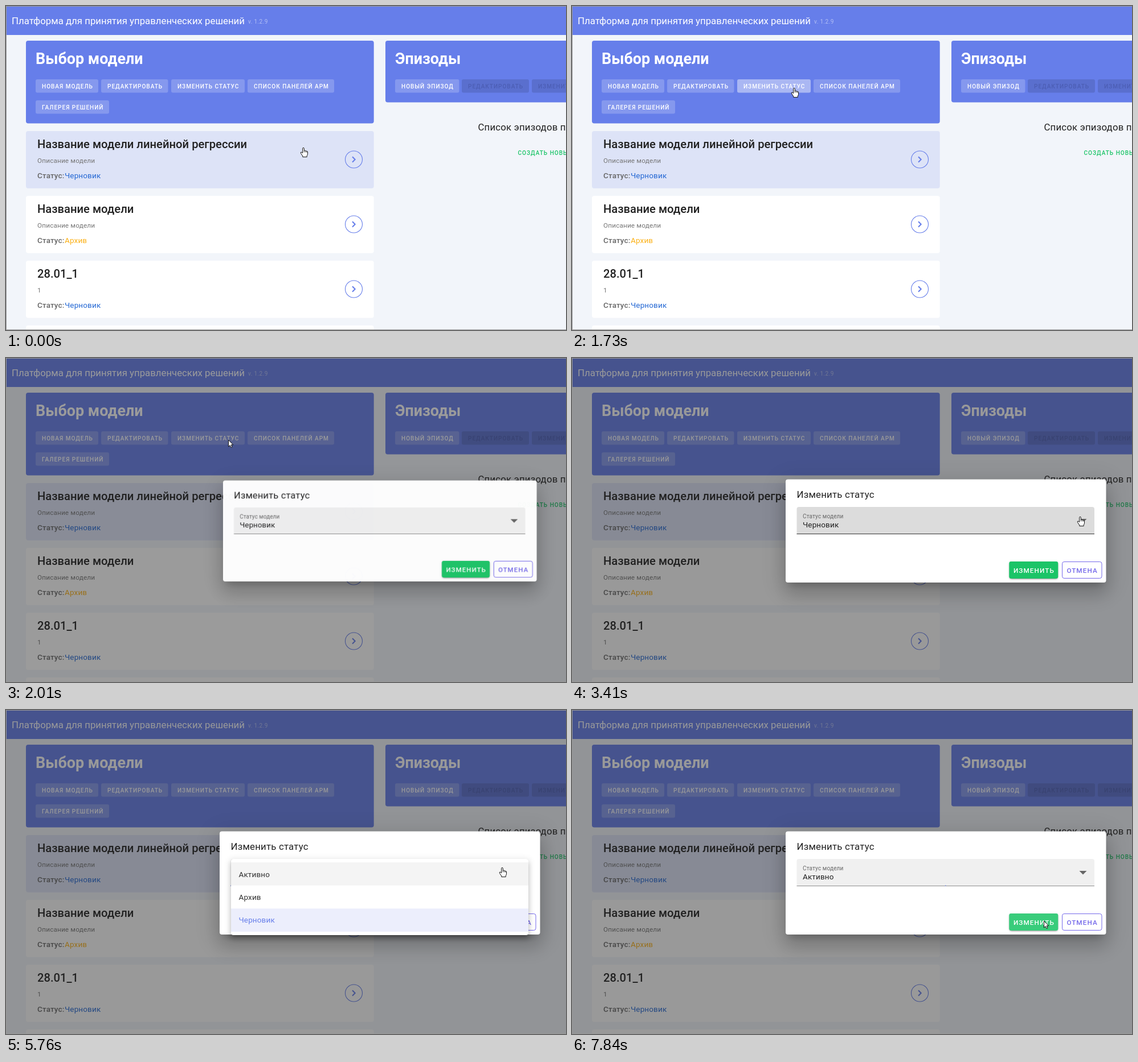
Write an HTML page with a canvas that moves like this. It is 983 px wide and 570 px high and loops after 7.99 s.

```html
<!DOCTYPE html>
<html lang="ru">
<head>
<meta charset="utf-8">
<title>Изменить статус</title>
<style>
html, body { margin: 0; width: 100%; height: 100%; overflow: hidden; background: #f2f5fa; }
canvas { display: block; }
</style>
</head>
<body>
<canvas id="stage" width="983" height="570"></canvas>
<script>
const W = 983, H = 570, LOOP = 7990;
const BLUE = '#667eea', VIOLET = '#7468ea', GREEN = '#1bc467', INK = '#212121';
const screen = document.getElementById('stage').getContext('2d');

function makeLayer() {
  const c = document.createElement('canvas');
  c.width = W;
  c.height = H;
  return c.getContext('2d');
}
const page = makeLayer(), dialogLayer = makeLayer(), menuLayer = makeLayer();
let g = screen;

// ---- drawing helpers ----
function box(x1, y1, x2, y2, fill, r = 4) {
  g.fillStyle = fill;
  g.beginPath();
  g.roundRect(x1, y1, x2 - x1, y2 - y1, r);
  g.fill();
}

function text(str, x, y, size, color, weight = 400, spacing = 0) {
  g.font = `${weight} ${size}px Roboto, sans-serif`;
  g.letterSpacing = spacing + 'px';
  g.fillStyle = color;
  g.fillText(str, x, y);
}

// Shadows only: the shape itself is drawn off stage.
function shadow(x1, y1, x2, y2, list) {
  for (const [dy, blur, spread, alpha] of list) {
    g.save();
    g.shadowColor = `rgba(0,0,0,${alpha})`;
    g.shadowBlur = blur;
    g.shadowOffsetX = 3000;
    g.shadowOffsetY = dy;
    box(x1 - spread - 3000, y1 - spread, x2 + spread - 3000, y2 + spread, '#000');
    g.restore();
  }
}

function chip(x1, x2, y, label, off) {
  box(x1, y, x2, y + 23.5, off ? 'rgba(0,0,0,.12)' : 'rgba(255,255,255,.2)', 3);
  text(label, x1 + 11, y + 15.5, 10.1, off ? '#4c5eb4' : '#fff', 500, 0.95);
}

function modelCard(y, title, about, status, color, fill) {
  box(35, y, 645.7, y + 100.7, fill);
  text(title, 55, y + 30, 20.16, INK, 500);
  text(about, 55, y + 56, 11.76, '#757575', 400, 0.16);
  text('Статус:', 55, y + 83, 13.5, '#666', 500, 0.13);
  text(status, 103, y + 83, 13.5, color, 400, 0.13);
  g.strokeStyle = BLUE;
  g.lineWidth = 1.1;
  g.beginPath();
  g.arc(610.5, y + 50, 15, 0, 7);
  g.stroke();
  g.lineWidth = 2;
  g.beginPath();
  g.moveTo(608, y + 45.3);
  g.lineTo(612.7, y + 50);
  g.lineTo(608, y + 54.7);
  g.stroke();
}

function drawPage() {
  g = page;
  g.fillStyle = '#f2f5fa';
  g.fillRect(0, 0, W, H);
  g.fillStyle = BLUE;
  g.fillRect(0, 0, W, 51);
  text('Платформа для принятия управленческих решений', 10, 32, 16.8, '#fff');
  text('v. 1.2.9', 425, 31, 10.1, 'rgba(255,255,255,.5)', 400, 0.35);

  box(35, 61, 645.7, 206.5, BLUE);
  text('Выбор модели', 52, 102, 26.9, '#fff', 700);
  chip(52, 162, 129, 'НОВАЯ МОДЕЛЬ');
  chip(167, 284.5, 129, 'РЕДАКТИРОВАТЬ');
  chip(290, 419, 129, 'ИЗМЕНИТЬ СТАТУС');
  chip(424, 576, 129, 'СПИСОК ПАНЕЛЕЙ АРМ');
  chip(52, 181, 166, 'ГАЛЕРЕЯ РЕШЕНИЙ');

  box(666, 61, 1200, 169.5, BLUE);
  text('Эпизоды', 683, 102, 26.9, '#fff', 700);
  chip(683, 795.5, 129, 'НОВЫЙ ЭПИЗОД');
  chip(800, 918, 129, 'РЕДАКТИРОВАТЬ', true);
  chip(923, 1052, 129, 'ИЗМЕНИТЬ СТАТУС', true);
  text('Список эпизодов пуст', 828.5, 219, 16.8, INK, 400, 0.19);
  text('СОЗДАТЬ НОВЫЙ', 898.5, 262, 10.1, GREEN, 500, 0.95);

  const draft = ['Черновик', '#2468d4'];
  modelCard(220, 'Название модели линейной регрессии', 'Описание модели', ...draft, '#dde3f7');
  modelCard(334, 'Название модели', 'Описание модели', 'Архив', '#fbb117', '#fff');
  modelCard(448, '28.01_1', '1', ...draft, '#fff');
  box(35, 562, 645.7, 600, '#fff');
}

function drawDialog(s) {
  g = dialogLayer;
  g.clearRect(0, 0, W, H);
  shadow(375, 213.5, 937.5, 395, [[9.4, 12.8, -6, 0.2], [20.4, 32, 2.5, 0.14], [7.7, 39, 6.8, 0.12]]);
  box(375, 213.5, 937.5, 395, '#fff');
  text('Изменить статус', 394.5, 246, 16.8, INK, 400, 0.21);

  const tint = s.focus ? BLUE : '#666';
  box(394.5, 262, 917, 310, s.over ? '#dcdcdc' : '#f0f0f0', [4, 4, 0, 0]);
  text('Статус модели', 405, 282, 10.1, tint, 400, 0.1);
  text(s.value, 405, 298, 13.5, INK, 400, 0.13);
  g.fillStyle = tint;
  g.beginPath();
  g.moveTo(890.5, 283);
  g.lineTo(903.5, 283);
  g.lineTo(897, 289.5);
  g.fill();
  g.fillStyle = s.over ? '#333' : '#8e8e8e';
  g.fillRect(394.5, 309, 522.5, 1);
  if (s.line) {
    g.fillStyle = BLUE;
    g.fillRect(655.75 - 261.25 * s.line, 308.3, 522.5 * s.line, 1.7);
  }

  shadow(767.3, 358, 853.3, 388, [[2.5, 1, -1.7, 0.2], [1.7, 1.7, 0, 0.14], [0.8, 4.2, 0, 0.12]]);
  box(767.3, 358, 853.3, 388, GREEN, 3.4);
  box(767.3, 358, 853.3, 388, `rgba(255,255,255,${s.press})`, 3.4);
  text('ИЗМЕНИТЬ', 775, 377.5, 11.76, '#fff', 500, 1.05);
  g.strokeStyle = VIOLET;
  g.lineWidth = 1;
  g.beginPath();
  g.roundRect(860.5, 358.5, 69.5, 29, 3.4);
  g.stroke();
  text('ОТМЕНА', 868.5, 377.5, 11.76, VIOLET, 500, 1.05);
}

function drawMenu(press) {
  g = menuLayer;
  g.clearRect(0, 0, W, H);
  shadow(395, 262, 917, 396, [[4.2, 4.2, -2.5, 0.2], [6.8, 8.5, 0.8, 0.14], [2.5, 12, 1.7, 0.12]]);
  box(395, 262, 917, 396, '#fff');
  g.fillStyle = press ? '#e4e4e4' : '#f4f4f4';
  g.fillRect(395, 268, 522, 40.7);
  g.fillStyle = '#eceefc';
  g.fillRect(395, 349.3, 522, 40.7);
  ['Активно', 'Архив', 'Черновик'].forEach((name, i) =>
    text(name, 408.5, 293.5 + i * 40.4, 13.5, i === 2 ? BLUE : '#333', 400, 0.13));
}

function drawLayer(layer, cx, cy, scale, alpha) {
  screen.save();
  screen.globalAlpha = alpha;
  screen.translate(cx, cy);
  screen.scale(scale, scale);
  screen.drawImage(layer.canvas, -cx, -cy);
  screen.restore();
}

const HAND = new Path2D('M-1.3 1.6Q-1.3.4 0 .4Q1.3.4 1.3 1.6V5.6Q2.6 4.7 3.6 5.8Q5 5.2 5.7 6.5Q7.5 6.2 7.5 8V11.5Q7.4 13 6.2 14.5V16.6H-1.2V15L-4.2 10.6Q-5.4 8.8-4.2 8.1Q-3 7.7-1.3 9.8Z');
const KNUCKLES = new Path2D('M1.3 5.6V8.4M3.6 5.8V8.4M5.7 6.5V8.8');
const ARROW = new Path2D('M.5.3V12L3.2 9.5L5 13.4L7 12.5L5.2 8.7H8.9Z');

function drawCursor(x, y, hand) {
  screen.save();
  screen.translate(x, y);
  screen.fillStyle = '#fff';
  screen.strokeStyle = '#111';
  screen.lineWidth = 1;
  screen.fill(hand ? HAND : ARROW);
  screen.stroke(hand ? HAND : ARROW);
  if (hand) {
    screen.lineWidth = 0.8;
    screen.stroke(KNUCKLES);
  }
  screen.restore();
}

// ---- timeline ----
// Number of steps taken out of n, the first at `from` and the last at `to`.
function steps(t, from, to, n) {
  if (t < from) return 0;
  return Math.min(n, 1 + Math.floor((t - from) / (to - from) * (n - 1) + 0.01));
}

const ease = p => p * p * (3 - 2 * p);

const PLACES = [[522, 249], [390, 144], [892, 279], [849, 367], [871, 277], [828, 371]];

function cursorAt(progress) {
  const leg = progress.findIndex(p => p < 1);
  if (leg < 0) return PLACES[5];
  const [x1, y1] = PLACES[leg], [x2, y2] = PLACES[leg + 1], p = ease(progress[leg]);
  return [Math.round(x1 + (x2 - x1) * p), Math.round(y1 + (y2 - y1) * p)];
}

const within = (x, y, x1, y1, x2, y2) => x >= x1 && x <= x2 && y >= y1 && y <= y2;

function render(t) {
  const reach = steps(t, 250, 1080, 7);
  const open = steps(t, 1580, 2150, 5);
  const toSelect = steps(t, 2430, 3410, 8);
  const drop = steps(t, 3780, 4710, 8);
  const browse = steps(t, 4830, 5760, 7);
  const pick = steps(t, 6210, 7190, 9);
  const confirm = steps(t, 7590, 7840, 3);

  const [x, y] = cursorAt([reach / 7, toSelect / 8, Math.max(0, drop - 3) / 5,
    browse / 7, Math.max(0, pick - 3) / 6]);
  const menu = pick ? [1, 1, 0.5, 0][Math.min(pick, 3)] : [0, 0, 0.6, 1][Math.min(drop, 3)];
  const onSelect = within(x, y, 395, 262, 917, 310);
  const onButton = within(x, y, 767, 358, 853, 388);

  screen.drawImage(page.canvas, 0, 0);
  const flash = [0, 0.12, 0.3, 0.08, 0, 0][open];
  if (flash) {
    g = screen;
    box(290, 129, 419, 152.5, `rgba(255,255,255,${flash})`, 3);
  }

  const shown = [0, 0, 0, 0.55, 0.97, 1][open];
  if (shown) {
    screen.fillStyle = `rgba(33,33,33,${0.46 * shown})`;
    screen.fillRect(0, 0, W, H);
    drawDialog({
      value: pick > 1 ? 'Активно' : 'Черновик',
      over: onSelect && pick < 2,
      focus: drop > 0 && confirm < 2,
      line: drop ? [1, 0.6, 0.2, 0.002][confirm] : 0,
      press: confirm ? [0, 0.06, 0.1, 0.13][confirm] : onButton && pick > 3 ? 0.05 : 0
    });
    drawLayer(dialogLayer, 656, 304, [0, 0, 0, 0.762, 0.979, 1][open], shown);
  }
  if (menu) {
    drawMenu(pick === 1);
    drawLayer(menuLayer, 656, 262, menu < 1 && !pick ? 0.92 : 1, menu);
  }

  const hand = open < 3
    ? y >= 220 || y <= 153
    : confirm < 3 && (menu > 0 || onSelect || onButton);
  drawCursor(x, y, hand);

  screen.fillStyle = '#999';
  screen.fillRect(0, 0, W, 1);
  screen.fillRect(0, 0, 1, H);
  screen.fillRect(0, H - 1, W, 1);
}

drawPage();
const start = performance.now();
function tick() {
  render((performance.now() - start) % LOOP);
  requestAnimationFrame(tick);
}
tick();
</script>
</body>
</html>
```
